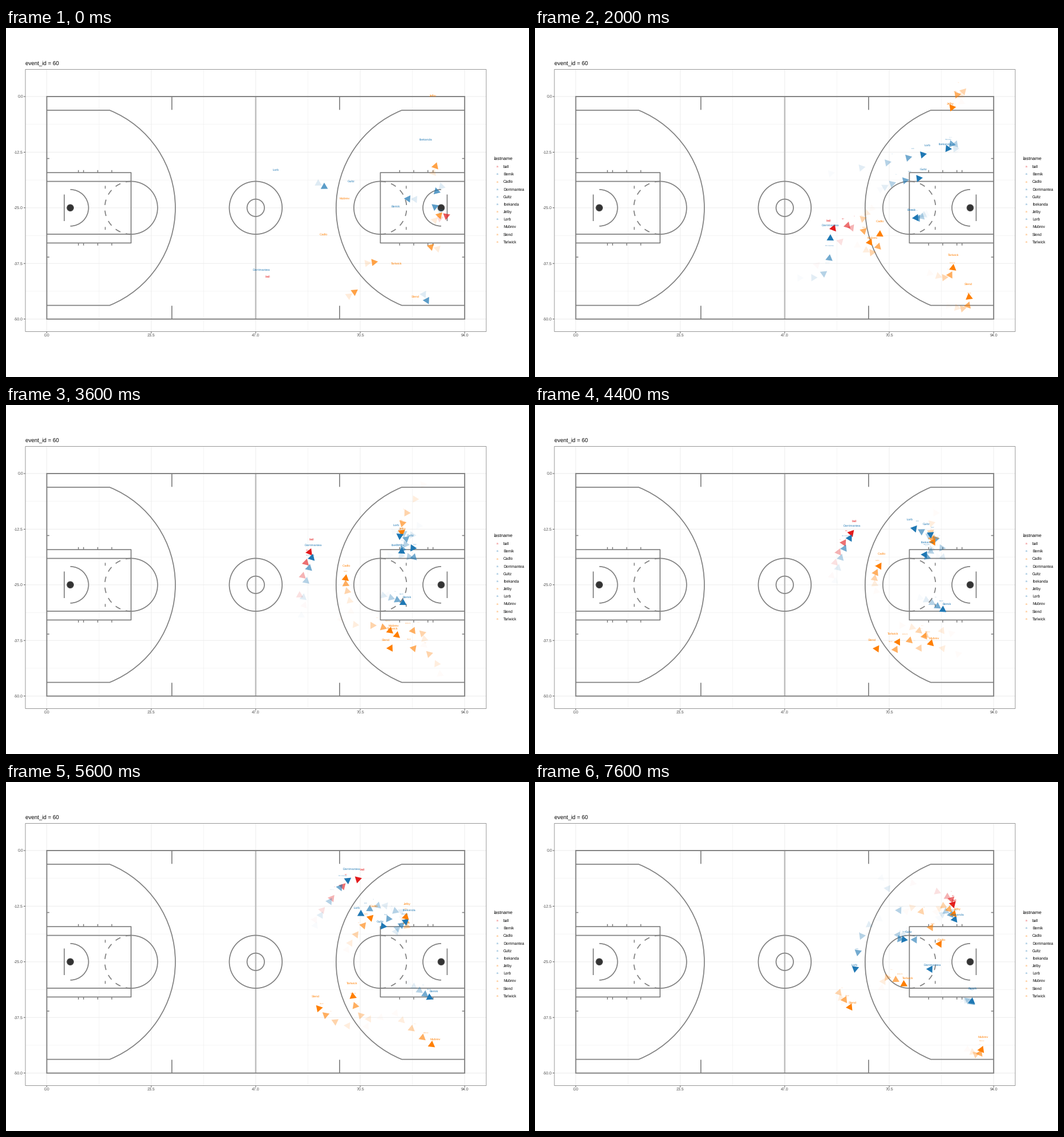
Animation of 917 by 611 pixels, one loop 8000 ms. Source, as a matplotlib script:

```python
import numpy as np
import matplotlib.pyplot as plt
from matplotlib.animation import FuncAnimation
from matplotlib.patches import Arc, Circle, Polygon, Rectangle

W, H, DPI = 917, 611, 100
FRAMES, STEP_MS = 20, 400
BLUE, ORANGE, RED = "#1F78B4", "#FF7F00", "#E31A1C"
COURT = "#7F7F7F"
X0, X1, Y0, Y1 = 71.5, 804.2, 120, 509.6
MID_X, MID_Y = (X0 + X1) / 2, (Y0 + Y1) / 2

plt.rcParams.update({"font.family": "Liberation Sans", "text.hinting": "none",
                     "path.snap": False})

fig = plt.figure(figsize=(W / DPI, H / DPI), dpi=DPI, facecolor="white")
ax = fig.add_axes([0, 0, 1, 1])
ax.set_xlim(0, W)
ax.set_ylim(H, 0)
ax.axis("off")


def px(size):
    return size * 72 / DPI


def line(xs, ys, color=COURT, width=1.7, z=2):
    ax.plot(xs, ys, color=color, lw=px(width), zorder=z, solid_capstyle="butt")


def text(x, y, s, size, color="black", ha="center", alpha=1):
    return ax.text(x, y, s, fontsize=px(size), color=color, ha=ha,
                   va="center", zorder=6, alpha=alpha)


def arc(x, y, r, start, end, **style):
    ax.add_patch(Arc((x, y), 2 * r, 2 * r, theta1=start, theta2=end,
                     color=COURT, lw=px(1.7), zorder=2, **style))


def draw_panel():
    for i in range(5):
        x = X0 + i * (X1 - X0) / 4
        y = Y0 + i * (Y1 - Y0) / 4
        line([x, x], [72.5, 531.5], "#EBEBEB", 0.9, 0)
        line([34, 842], [y, y], "#EBEBEB", 0.9, 0)
        line([x, x], [531.5, 534.5], "#333333", 0.8)
        line([31, 34], [y, y], "#333333", 0.8)
        text(x, 538.5, f"{23.5 * i:.1f}", 7, "#4D4D4D")
        text(30, y + 0.5, f"{-12.5 * i if i else 0:.1f}", 7, "#4D4D4D", "right")
        if i < 4:
            xm, ym = x + (X1 - X0) / 8, y + (Y1 - Y0) / 8
            line([xm, xm], [72.5, 531.5], "#EBEBEB", 0.45, 0)
            line([34, 842], [ym, ym], "#EBEBEB", 0.45, 0)
    ax.add_patch(Rectangle((34, 72.5), 808, 459, fill=False, ec="#8C8C8C",
                           lw=px(0.9), zorder=3))
    text(33.5, 62.5, "event_id = 60", 9.8, ha="left")


def draw_half(side):
    """Half of the court: side is -1 for the left and 1 for the right."""
    def at(d):
        return MID_X + side * (MID_X - X0 - d)

    def facing(span):
        return (-span, span) if side < 0 else (180 - span, 180 + span)

    hoop, radius = at(41.2), 184.2
    arc(hoop, MID_Y, radius, *facing(np.degrees(np.arcsin(170.6 / radius))))
    arc(hoop, MID_Y, 32, *facing(90))
    start, end = facing(90)
    arc(at(148), MID_Y, 46.3, start, end)
    # Fifteen equal dashes and gaps, so a dash sits at either end
    dash = np.pi * 46.3 / 15 / 1.7
    arc(at(148), MID_Y, 46.3, start + 180, end + 180, linestyle=(0, (dash, dash)))
    line([at(30.7)] * 2, [291.5, 338])
    ax.add_patch(Circle((hoop, MID_Y), 5.8, fc="#333333", ec="#4D4D4D",
                        lw=px(1), zorder=2))
    line([at(147.8)] * 2, [252.6, 377])
    for s in (-1, 1):
        def level(d):
            return MID_Y + s * d
        line([at(0), at(111)], [level(170.8)] * 2)
        line([at(219.3)] * 2, [level(194.7), level(171.5)])
        line([at(0), at(4.5)], [level(86.3)] * 2, width=1.5)
        for d in (61.6, 46.2):
            line([at(0), at(147.8)], [level(d)] * 2)
        for d in (55.5, 64.5, 89.3, 114):
            line([at(d)] * 2, [level(62), level(66)], width=1.5)
        line([at(102.5)] * 2, [level(33.5), level(38.5)], width=1.5)


def draw_court():
    draw_half(-1)
    draw_half(1)
    line([MID_X] * 2, [Y0, Y1], "#BEBEBE", 2.5)
    for radius in (46.3, 15.2):
        arc(MID_X, MID_Y, radius, 0, 360)
    ax.add_patch(Rectangle((X0, Y0), X1 - X0, Y1 - Y0, fill=False, ec=COURT,
                           lw=px(1.9), zorder=2))


# Every path is a smooth curve through its places at these steps
KEYS = np.array([0, 3, 5, 7, 11, 14, 16, 19])
rng = np.random.default_rng(4)


def smooth(values, steps):
    slope = np.gradient(values, KEYS)
    i = np.clip(np.searchsorted(KEYS, steps, "right") - 1, 0, len(KEYS) - 2)
    h = KEYS[i + 1] - KEYS[i]
    u = (steps - KEYS[i]) / h
    return ((1 + 2 * u) * (1 - u) ** 2 * values[i]
            + u * u * (3 - 2 * u) * values[i + 1]
            + h * u * (1 - u) * ((1 - u) * slope[i] - u * slope[i + 1]))


class Mover:
    """A named marker; `last` is where it ended the play before this one."""

    def __init__(self, name, color, last, *places):
        self.name, self.color, self.last = name, color, np.array(last)
        self.last_heading = rng.uniform(0, 2 * np.pi)
        steps = np.arange(FRAMES)
        self.x, self.y = (smooth(v, steps) for v in np.array(places, float).T)
        self.heading = np.arctan2(np.diff(self.y, prepend=self.y[0]),
                                  np.diff(self.x, prepend=self.x[0]))


MOVERS = (
    Mover("ball", RED, (772, 329), (459, 450), (560, 343), (515, 352), (522, 291),
          (560, 218), (625, 168), (713, 195), (735, 222)),
    Mover("Bemik", BLUE, (705, 299), (683, 327), (670, 333), (660, 333), (683, 340),
          (722, 363), (750, 381), (764, 380), (767, 376)),
    Mover("Cadlo", ORANGE, (645, 410), (557, 376), (599, 392), (605, 353),
          (596, 318), (608, 275), (645, 232), (669, 217), (713, 291)),
    Mover("Dorrimantea", BLUE, (558, 278), (448, 438), (513, 425), (518, 360),
          (528, 300), (556, 226), (606, 167), (622, 194), (697, 335)),
    Mover("Gultz", BLUE, (752, 313), (605, 283), (634, 270), (681, 262),
          (715, 267), (686, 223), (656, 259), (639, 272), (655, 277)),
    Mover("Ibekanda", BLUE, (755, 286), (736, 210), (729, 205), (719, 218),
          (696, 251), (688, 255), (707, 239), (721, 227), (741, 247)),
    Mover("Jelby", ORANGE, (753, 242), (748, 133), (743, 109), (728, 147),
          (698, 196), (702, 247), (703, 228), (716, 217), (740, 237)),
    Mover("Lorb", BLUE, (738, 477), (473, 263), (626, 234), (688, 220),
          (698, 233), (657, 215), (615, 235), (579, 255), (560, 335)),
    Mover("Mubrev", ORANGE, (760, 328), (594, 313), (573, 342), (592, 382),
          (651, 386), (700, 423), (753, 465), (775, 476), (786, 461)),
    Mover("Slend", ORANGE, (745, 383), (718, 485), (758, 489), (760, 463),
          (736, 430), (591, 426), (543, 390), (534, 370), (557, 401)),
    Mover("Tarlwick", ORANGE, (611, 462), (685, 427), (726, 436), (734, 412),
          (724, 394), (628, 415), (607, 367), (615, 342), (654, 358)),
)


def draw_legend():
    text(855, 228.5, "lastname", 8.2, ha="left")
    for i, mover in enumerate(MOVERS):
        y = 243 + 13.15 * i
        text(861, y, "a", 5.5, mover.color, alpha=0.75)
        text(872, y + 0.3, mover.name, 6.7, ha="left")


draw_panel()
draw_court()
draw_legend()
live = []


def fade(age):
    return max(0, 1 - age / 4.7) ** 2


def marker(x, y, heading, color, alpha):
    a = heading + np.radians([0, 120, 240])
    points = np.column_stack([x + 7.3 * np.cos(a), y + 7.3 * np.sin(a)])
    live.append(ax.add_patch(Polygon(points, fc=color, ec="none", alpha=alpha,
                                     zorder=4)))


def update(frame):
    while live:
        live.pop().remove()
    # The wake of the play before fades out first
    for m in MOVERS:
        a = m.last_heading
        for back, age in ((12, 2.9), (0, 0.7)):
            x, y = m.last - back * np.array([np.cos(a), np.sin(a)])
            marker(x, y, a, m.color, fade(frame + age))
    for age in range(min(4, frame), -1, -1):
        step = frame - age
        for m in MOVERS:
            x, y, a = m.x[step], m.y[step], m.heading[step]
            if step > 0:
                marker(x - 8.3 * np.cos(a), y - 8.3 * np.sin(a), a, m.color,
                       fade(age))
            if age < 3:
                live.append(text(x, y - 14, m.name, 5.5 * 0.53 ** age, m.color,
                                 alpha=fade(age)))
    return live


anim = FuncAnimation(fig, update, frames=FRAMES, interval=STEP_MS,
                     repeat=True, repeat_delay=0, blit=False)
plt.show()
```
